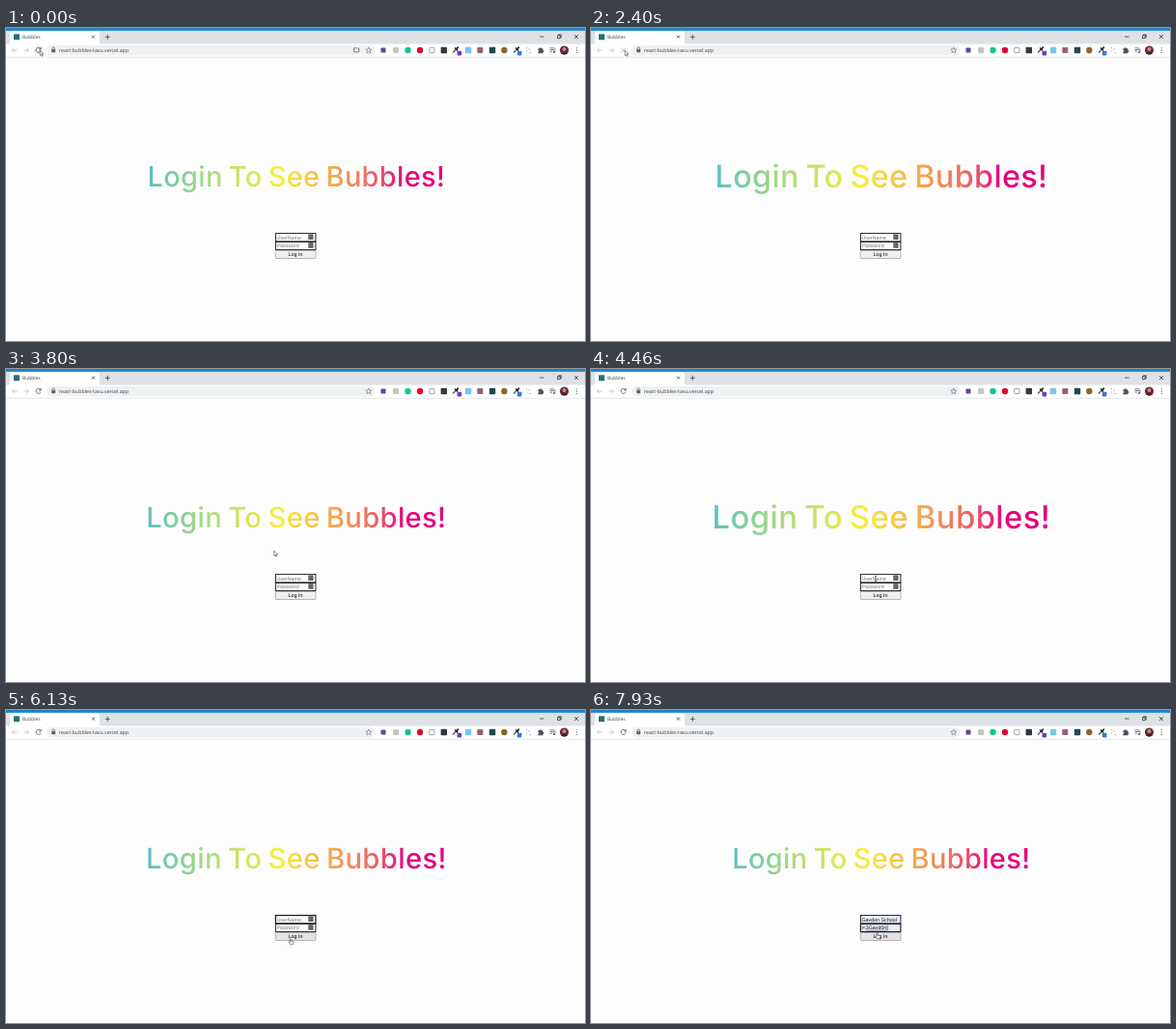
An HTML page for the animation above (8 s loop, 600 px wide and 324 px high).

```html
<!DOCTYPE html>
<html lang="en">
<head>
<meta charset="utf-8">
<title>Bubbles</title>
<style>
  html, body { margin: 0; width: 100%; height: 100%; overflow: hidden; background: #fdfdfd; }
  svg { display: block; width: 100%; height: 100%; }
  text { text-rendering: geometricPrecision; white-space: pre; }
  .ui { font-family: "Open Sans", sans-serif; fill: #3c4043; }
  .form { font: 5.33px "Liberation Sans", Arial, sans-serif; }
  .title { font: 500 28.9px Inter, sans-serif; letter-spacing: .35px; word-spacing: -1.9px; text-anchor: middle; }
  .line { fill: none; stroke: #5f6368; stroke-width: .8; }
</style>
</head>
<body>
<svg viewBox="0 0 600 324">
  <defs>
    <linearGradient id="rainbow" gradientUnits="userSpaceOnUse" x1="146" y1="0" x2="454" y2="0">
      <stop offset="0" stop-color="#5bc0c0"/>
      <stop offset=".2" stop-color="#a8da82"/>
      <stop offset=".45" stop-color="#f7ed3e"/>
      <stop offset=".63" stop-color="#f3a650"/>
      <stop offset=".78" stop-color="#ea5a69"/>
      <stop offset=".87" stop-color="#e5007d"/>
    </linearGradient>
    <clipPath id="face"><circle cx="578.5" cy="23" r="4.6"/></clipPath>
    <g id="dropper">
      <path d="M-3 3L1-1" stroke="#555" stroke-width="1.3"/>
      <path d="M-.8-2L2 .8M1-1L2.8-2.8" stroke="#222" stroke-width="1.7"/>
    </g>
    <g id="keypad">
      <rect x="313.3" y="-2.8" width="5.2" height="5.4" rx=".5" fill="#555"/>
      <path d="M314-1h4M314 .8h4" stroke="#bbb" stroke-width=".5" stroke-dasharray=".8 .4"/>
    </g>
  </defs>

  <rect width="600" height="324" fill="#fdfdfd"/>

  <!-- tab strip -->
  <rect width="600" height="17" fill="#dee1e6"/>
  <rect width="600" height="2.8" fill="#1c82cc"/>
  <path d="M2 17Q4 17 4 14V6Q4 3.5 6.5 3.5H94.5Q97 3.5 97 6V14Q97 17 99 17Z" fill="#fff"/>
  <rect id="favicon" x="8" y="6.2" width="6" height="6" rx=".5" fill="#23707c"/>
  <circle id="spinner" cx="11" cy="9.2" r="3.1" fill="none" stroke="#3b82dc" stroke-width=".9" stroke-dasharray="11 8.5"/>
  <text class="ui" x="17" y="11.2" font-size="4.9">Bubbles</text>
  <path class="line" d="M89 7.6l3 3m0-3l-3 3M102.800 9.300h5m-2.500-2.500v5" style="stroke:#3c4043"/>
  <path d="M553 9h4.500M571.500 7.800h2.800v2.800h-2.800zM572.500 7.800V6.800h2.800v2.800h-1M589 7l4 4m0-4l-4 4" fill="none" stroke="#222" stroke-width=".7"/>

  <!-- toolbar -->
  <rect y="16.5" width="600" height="13.5" fill="#fff"/>
  <path d="M0 30.2H600" stroke="#dcdee1" stroke-width=".7"/>
  <path class="line" d="M11.500 23H6.500m2.300-2.300L6.500 23l2.300 2.300M18.500 23h5m-2.300-2.300L23.500 23l-2.300 2.300" style="stroke:#b9bbbe"/>
  <circle id="hover" cx="33.5" cy="23" r="5" fill="#eceef0"/>
  <path id="reload" class="line" d="M35.600 21.300A2.500 2.500 0 1 0 36 23.500M36.200 20v2h-2" style="stroke-width:.95"/>
  <path id="stop" class="line" d="M31.300 20.700l4.600 4.600m0-4.600l-4.600 4.600" style="stroke-width:.95"/>
  <rect x="42" y="17.7" width="340.5" height="10.8" rx="5.4" fill="#eff1f3"/>
  <path d="M48 22.200v-1a1.200 1.200 0 0 1 2.400 0v1" class="line"/>
  <rect x="47.2" y="22" width="4" height="3.2" rx=".4" fill="#5f6368"/>
  <text class="ui" x="55" y="25" font-size="5.22">react-bubbles-tavu.vercel.app</text>
  <path id="install" class="line" d="M364 20.800h-3.500v4h5.500v-1.500M365.500 20.200v2.600m-1-1l1 1l1-1"/>
  <path d="M375.800 20l.9 1.950 2.100.2-1.600 1.400.5 2.100-1.900-1.100-1.900 1.100.5-2.100-1.600-1.400 2.100-.2z" class="line" style="stroke-width:.6"/>

  <g id="icons"></g>
  <g id="blocked"></g>
  <use href="#dropper" x="466" y="22.5"/>
  <rect x="467.5" y="23.8" width="4.6" height="4.6" rx=".8" fill="#7438c4"/>
  <use href="#dropper" x="529" y="22.5"/>
  <rect x="529.8" y="23.8" width="4.6" height="4.6" rx=".8" fill="#3478dc"/>
  <path d="M539 20.500h1m1.500 1.500h1.500m-4 2h1m2.500 1.500h1.500" stroke="#aaa"/>
  <path d="M551.300 21.300h1.600a1 1 0 0 1 2 0h1.500v1.600a1 1 0 0 1 0 2v1.400h-5.100v-1.500a1 1 0 0 0 0-2z" fill="#4c5054"/>
  <path d="M563.500 20.800h4.500m-4.500 1.700h4.500m-4.500 1.700h2.500M568.800 21v4" class="line"/>
  <circle cx="567.9" cy="25" r="1.1" fill="#5f6368"/>
  <g clip-path="url(#face)">
    <rect x="573" y="18" width="11" height="11" fill="#6e2b3a"/>
    <circle cx="578.5" cy="22" r="1.9" fill="#c98e8a"/>
    <ellipse cx="578.5" cy="28" rx="3.4" ry="3.5" fill="#3a2630"/>
  </g>
  <path d="M591.300 20.200v6" stroke="#5f6368" stroke-width="1.1" stroke-dasharray="1.1 1.3"/>

  <!-- page -->
  <g id="title"><text class="title" x="300.8" y="163.7" fill="url(#rainbow)">Login To See Bubbles!</text></g>
  <g class="form">
    <rect id="userBox" x="279.4" y="212.6" width="41.5" height="8.3" stroke="#222"/>
    <rect id="passBox" x="279.4" y="221.5" width="41.5" height="8.1" stroke="#222"/>
    <text id="user" x="280.4" y="218.6"></text>
    <text id="pass" x="280.4" y="227.4"></text>
    <g id="keypads"><use href="#keypad" y="216.3"/><use href="#keypad" y="225.1"/></g>
    <path id="underline" d="M284.800 228.300H306.500" stroke="#333" stroke-width=".5"/>
    <path id="caret" d="M307.200 222.600v5.800" stroke="#111" stroke-width=".6"/>
    <rect id="button" x="279.3" y="230.5" width="41.7" height="8" rx=".7" stroke="#8a8a8a" stroke-width=".6"/>
    <text x="300" y="235.8" text-anchor="middle">Log In</text>
  </g>

  <!-- pointers, each with its hot spot at 0,0 -->
  <g id="pointer" stroke-linejoin="round">
    <path id="arrow" d="M0 0V5.200L1.200 4.100L2 5.900L2.900 5.500L2.100 3.800H3.700Z" fill="#fff" stroke="#333" stroke-width=".55"/>
    <path id="beam" d="M-1-2.500H1M0-2.500V2.500M-1 2.500H1" fill="none" stroke="#222" stroke-width=".6"/>
    <path id="hand" d="M0 .4Q.6-.3 1 .4V2.300L3.400 2.900Q4 3.200 3.800 4L3.200 6H.8L-1 3.700Q-.8 2.900 0 3.500Z" fill="#fff" stroke="#222" stroke-width=".55"/>
  </g>
</svg>
<script>
const LOOP = 8000, PULSE = 2000;
const $ = id => document.getElementById(id);
const show = (id, on) => $(id).setAttribute('display', on ? 'inline' : 'none');
const set = (id, attrs) => { for (const k in attrs) $(id).setAttribute(k, attrs[k]); };

const square = (x, color, size = 6.4, extra = '') =>
  `<rect x="${x - size / 2}" y="${23 - size / 2}" width="${size}" height="${size}" rx=".8" fill="${color}" ${extra}/>`;
const disc = (x, color) => `<circle cx="${x}" cy="23" r="3.2" fill="${color}"/>`;

$('icons').innerHTML =
  square(391, '#65439b', 5) + square(404, '#c3cabd', 6) + disc(416.5, '#15c38e') + disc(429, '#e1062c') +
  square(441.3, '#fff', 5.2, 'stroke="#777" stroke-width=".7"') + square(453.8, '#34383c') +
  square(479, '#79c5ee') + disc(516.3, '#8d642e');

// CSS "ease", solved for y at a given x
function ease(x) {
  const bez = (a, b, s) => 3 * a * s * (1 - s) ** 2 + 3 * b * s * s * (1 - s) + s ** 3;
  let lo = 0, hi = 1;
  for (let i = 0; i < 24; i++) {
    const mid = (lo + hi) / 2;
    if (bez(.25, .25, mid) < x) lo = mid; else hi = mid;
  }
  return bez(.1, 1, lo);
}

// pointer stops: time, x, y
const stops = [
  [0, 35.2, 23.3], [3050, 35.2, 23.3], [3750, 277.8, 188.3], [3900, 277.8, 188.3],
  [4400, 295, 217], [4700, 295, 217], [5000, 295, 224], [5900, 295, 224],
  [6250, 293.8, 241.5], [7350, 293.8, 241.5], [7800, 296, 230.8], [LOOP, 296, 230.8]
];

function pointerAt(t) {
  const i = stops.findIndex(s => s[0] > t);
  const [t0, x0, y0] = stops[i - 1], [t1, x1, y1] = stops[i];
  const p = (t - t0) / (t1 - t0), k = p * p * (3 - 2 * p);
  return [x0 + (x1 - x0) * k, y0 + (y1 - y0) * k];
}

function draw(t) {
  // title pulse
  const phase = (t - 60 + PULSE) % PULSE / (PULSE / 2);
  const grow = phase < 1 ? ease(phase) : 1 - ease(phase - 1);
  set('title', { transform: `translate(300 153) scale(${1 + .2 * grow}) translate(-300 -153)` });

  // page reload
  const clicked = t >= 1600, loading = clicked && t < 2040, stopping = clicked && t < 3150;
  show('hover', t < 2040);
  show('install', !clicked);
  show('reload', !stopping);
  show('stop', stopping);
  $('stop').style.stroke = loading ? '#4a4d51' : '#b4b6b9';
  show('spinner', loading);
  set('spinner', { transform: `rotate(${t * .4} 11 9.2)` });
  set('favicon', { transform: loading ? 'translate(5.5 4.6) scale(.5)' : '' });
  $('blocked').innerHTML = square(491.3, loading ? '#e4e4e4' : '#98606f', 6) +
    square(504, loading ? '#ececec' : '#1f4a4a');

  // form
  const filled = t >= 6600, focused = t >= 4600;
  const [x, y] = pointerAt(t);
  const inside = x > 279 && x < 321;
  const overInput = inside && y > 212 && y < 230, overButton = inside && y >= 230 && y < 239;
  const fill = filled ? '#e8f0fe' : '#fff', ink = filled ? '#111' : '#757575';
  set('userBox', { fill, 'stroke-width': focused && !filled ? 1.3 : 1 });
  set('passBox', { fill, 'stroke-width': filled ? 1.2 : 1 });
  $('user').textContent = filled ? 'Gavdon School' : 'UserName';
  $('pass').textContent = filled ? 'i<3Gavd0n' : 'Password';
  set('user', { fill: ink });
  set('pass', { fill: ink });
  show('keypads', !filled);
  show('underline', filled);
  show('caret', filled && (t - 6600) % 1060 < 530);
  set('button', { fill: overButton ? '#e3e3e3' : '#efefef' });

  // pointer
  set('pointer', { transform: `translate(${x} ${y})` });
  show('arrow', !overInput && !overButton);
  show('beam', overInput);
  show('hand', overButton);
}

const start = performance.now();
function tick() {
  draw((performance.now() - start) % LOOP);
  requestAnimationFrame(tick);
}
tick();
</script>
</body>
</html>
```
